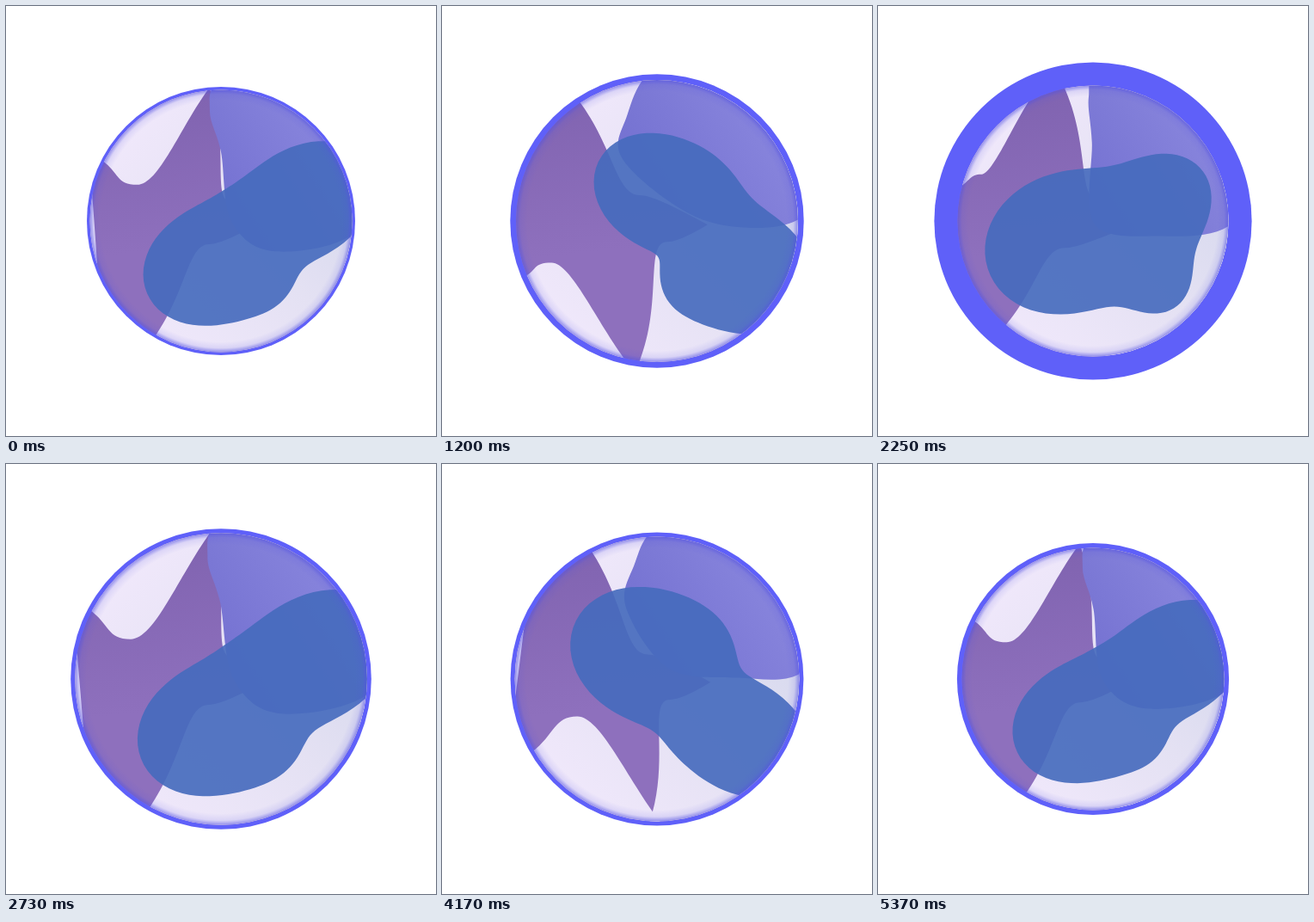
An HTML page with a canvas that plays this animation: 500 px wide and 500 px high, repeating every 5400 ms.

```html
<!DOCTYPE html>
<html lang="en">
<head>
<meta charset="utf-8">
<title>Pulsing orb</title>
<style>
html, body { margin: 0; width: 100%; height: 100%; overflow: hidden; background: #fff; }
canvas { display: block; width: 500px; height: 500px; }
</style>
</head>
<body>
<canvas id="stage" width="500" height="500"></canvas>
<script>
const ctx = document.getElementById('stage').getContext('2d');
const LOOP = 5400, SWIRL = 2700, BASE = 152, TAU = Math.PI * 2;

// Beats: time and rim radius at the peak.
const beats = [[330, 195], [860, 194.5], [1338, 191], [2080, 196.5], [2850, 194],
  [3200, 188], [3780, 197.5], [4380, 204], [4800, 198]];

// Each beat swells quickly, then shrinks at its own rate.
function swell(t, rest, drop, fall) {
  return Math.max(rest, ...beats.map(([at, peak]) => {
    let dt = t - at;
    if (dt < -LOOP / 2) dt += LOOP;
    if (dt > LOOP / 2) dt -= LOOP;
    return peak - drop - (dt < 0 ? -dt * .16 : dt * fall);
  }));
}

const clamp = (v, lo, hi) => Math.min(hi, Math.max(lo, v));
const mix = (a, b, u) => a.map((v, i) => v + (b[i] - v) * u);
const polar = (deg, r) => [r * Math.cos(deg * TAU / 360), r * Math.sin(deg * TAU / 360)];
const sway = ([mean, c, s], phase) => mean + c * Math.cos(phase * TAU) + s * Math.sin(phase * TAU);

// A pale finger that enters at the left, swings over the top and opens to the right.
function finger(age) {
  const decay = Math.exp(-2.3 * age);
  const from = 207 + 75 * age - 17 * age * age;
  const to = Math.min(380, 265 + 130 * age + 600 * Math.max(0, age) ** 2);
  const tip = [Math.max(25 - 122 * decay, 45 * age - 118), -20 - 22 * decay];
  const round = 25 * clamp(1 + 3 * age, 0, 1);
  const start = polar(from, 155), end = polar(to, 155);
  const flank = mix(start, tip, .5);
  ctx.beginPath();
  ctx.moveTo(...start);
  ctx.bezierCurveTo(flank[0] + 12 * Math.max(0, age), flank[1], tip[0] - round, tip[1], ...tip);
  ctx.bezierCurveTo(tip[0] + round, tip[1], ...mix(end, tip, .4), ...end);
  ctx.arc(0, 0, 260, to * TAU / 360, from * TAU / 360, true);
  ctx.fillStyle = paper;
  ctx.fill();
}

// The lower fingers mirror the upper ones, half a turn later.
function fingers(phase) {
  for (const [flip, shift] of [[1, .5], [-1, 1]]) {
    const age = (phase + shift) % 1 - .5;
    ctx.save();
    ctx.scale(1, flip);
    finger(age + 1);
    finger(age);
    ctx.restore();
  }
}

// Points as x and y, each with mean, cosine and sine part.
const veilPoints = [
  [[1, 0, -8], [-165, 0, 0]],
  [[-21, 8, -14], [-122, -6, 16]],
  [[-18, 18, -9], [-76, -4, 12]],
  [[14, -2, 13], [-7, 7, -8]],
  [[72, -12, -10], [18, 17, 11]],
  [[152, 0, 0], [6, 10, 6]],
  [[195, 0, 0], [-60, 0, 0]],
  [[95, 0, 0], [-195, 0, 0]]
];

function veil(phase) {
  const pts = veilPoints.map(p => p.map(axis => sway(axis, phase)));
  const n = pts.length, at = i => pts[(i + n) % n];
  ctx.beginPath();
  ctx.moveTo(...at(0));
  for (let i = 0; i < n; i++) {
    const [a, b, c, d] = [-1, 0, 1, 2].map(k => at(i + k));
    ctx.bezierCurveTo(
      b[0] + (c[0] - a[0]) / 6, b[1] + (c[1] - a[1]) / 6,
      c[0] - (d[0] - b[0]) / 6, c[1] - (d[1] - b[1]) / 6, ...c);
  }
  ctx.fillStyle = lilac;
  ctx.fill();
}

// Radius waves around the blob: cosine and sine part of each order, swaying in time.
const blobRadius = [100, 2, -4];
const blobWaves = [
  [[3, -2, 30], [-5, 4, 1]],
  [[7, 6, -10], [2, -39, -10]],
  [[-1.5, -3, 15], [-2, -3.6, -5]],
  [[-3, 0, 0], [0, -7, 0]]
];

function blob(phase) {
  const waves = blobWaves.map(w => w.map(part => sway(part, phase)));
  const mean = sway(blobRadius, phase);
  ctx.beginPath();
  for (let deg = 0; deg < 360; deg += 3) {
    const a = deg * TAU / 360;
    const r = waves.reduce((sum, [c, s], i) =>
      sum + c * Math.cos((i + 1) * a) + s * Math.sin((i + 1) * a), mean);
    const [x, y] = polar(deg, r);
    ctx.lineTo(40 + x, 20 + y);
  }
  ctx.fillStyle = 'rgba(70,107,190,.91)';
  ctx.fill();
}

function disc(r, fill) {
  ctx.beginPath();
  ctx.arc(0, 0, r, 0, TAU);
  ctx.fillStyle = fill;
  ctx.fill();
}

function gradient(g, ...stops) {
  stops.forEach(([at, color]) => g.addColorStop(at, color));
  return g;
}
const paper = gradient(ctx.createLinearGradient(-110, -110, 120, 120), [0, '#f0e8fb'], [.5, '#e4e1f3'], [1, '#d2d6ec']);
const plum = gradient(ctx.createLinearGradient(-60, -150, -40, 30), [0, '#8063b0'], [1, '#8e70bd']);
const lilac = gradient(ctx.createLinearGradient(0, -40, 110, -110), [0, '#7673d2'], [1, '#8784dc']);
const edge = gradient(ctx.createRadialGradient(0, 0, BASE - 12, 0, 0, BASE),
  [0, 'rgba(84,82,225,0)'], [.6, 'rgba(84,82,225,.12)'], [1, 'rgba(84,82,225,.6)']);

function draw(now) {
  const t = Math.floor(now / 30) * 30 % LOOP, phase = t % SWIRL / SWIRL;
  const inner = swell(t, 152.5, 5, .2);
  ctx.setTransform(1, 0, 0, 1, 0, 0);
  ctx.clearRect(0, 0, 500, 500);
  ctx.translate(250, 250);
  disc(swell(t, 156, 0, .07), '#5f60f9');
  ctx.save();
  ctx.scale(inner / BASE, inner / BASE);
  disc(BASE, plum);
  ctx.clip();
  fingers(phase);
  veil(phase);
  blob(phase);
  disc(BASE, edge);
  ctx.restore();
}

const start = performance.now();
function tick() {
  draw(performance.now() - start);
  requestAnimationFrame(tick);
}
tick();
</script>
</body>
</html>
```
